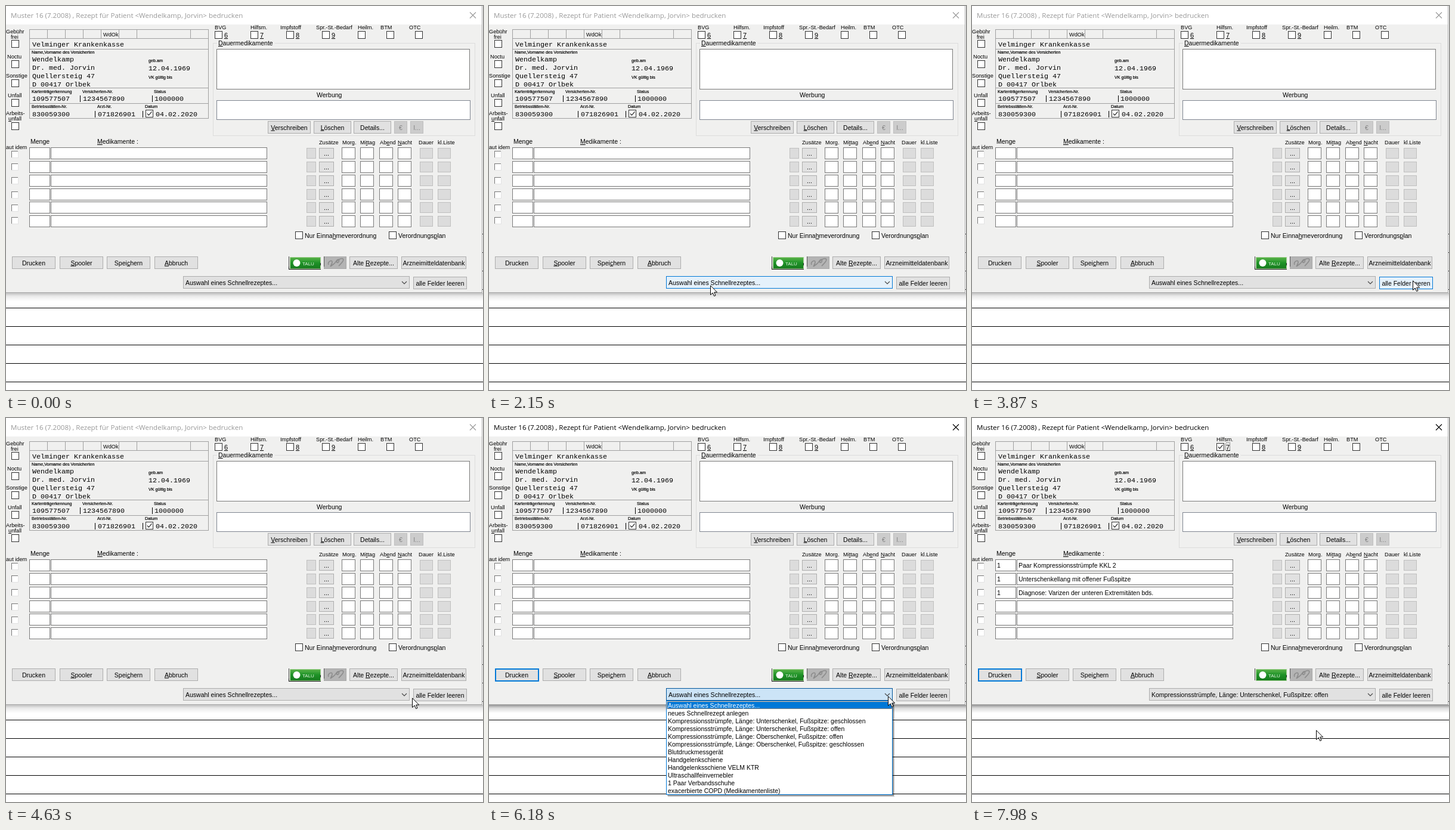
An HTML page for the animation above (8000 ms loop, 800x644 px).

```html
<!DOCTYPE html>
<html lang="de">
<head>
<meta charset="utf-8">
<title>Rezept bedrucken</title>
<style>
html, body { margin: 0; width: 100%; height: 100%; overflow: hidden; background: #fff; }
svg { display: block; width: 800px; height: 644px; font: 10.5px "Liberation Sans", Arial, sans-serif; }
text { white-space: pre; }
rect, .crisp { shape-rendering: crispEdges; }
.title { font: 11.55px "Open Sans", "Noto Sans", sans-serif; }
.mono { font: 11.67px "Liberation Mono", monospace; }
.s { font-size: 9.2px; }
.tiny { font-size: 7.2px; stroke: #000; stroke-width: .2px; }
.u { text-decoration: underline; }
</style>
</head>
<body>
<svg id="stage" viewBox="0 0 800 644"></svg>
<script>
const LOOP = 8000, BLUE = '#0078d7', FACE = '#f0f0ef';
const HINT = 'Auswahl eines Schnellrezeptes...';
const ITEMS = [
  HINT, 'neues Schnellrezept anlegen',
  'Kompressionsstrümpfe, Länge: Unterschenkel, Fußspitze: geschlossen',
  'Kompressionsstrümpfe, Länge: Unterschenkel, Fußspitze: offen',
  'Kompressionsstrümpfe, Länge: Oberschenkel, Fußspitze: offen',
  'Kompressionsstrümpfe, Länge: Oberschenkel, Fußspitze: geschlossen',
  'Blutdruckmessgerät', 'Handgelenkschiene', 'Handgelenksschiene VELM KTR',
  'Ultraschallfeinvernebler', '1 Paar Verbandsschuhe',
  'exacerbierte COPD (Medikamentenliste)'
];
const ROWS = [237, 260, 283, 306, 328, 351];

// --- drawing helpers: "&" marks the underlined access key ---
const esc = s => s.replace(/</g, '&lt;').replace(/>/g, '&gt;');
const label = s => esc(s).replace(/&(?!lt;|gt;)(.)/, '<tspan class="u">$1</tspan>');
const text = (x, y, s, cls = '', more = '') =>
  `<text x="${x}" y="${y}" class="${cls}" ${more}>${label(s)}</text>`;
const fill = (x, y, w, h, c, more = '') =>
  `<rect x="${x}" y="${y}" width="${w}" height="${h}" fill="${c}" ${more}/>`;
const box = (x, y, w, h, c = '#fff', line = '#7a7a7a', more = '') =>
  fill(x + .5, y + .5, w - 1, h - 1, c, `stroke="${line}" ${more}`);
const path = (d, c, w = 1, more = '') =>
  `<path d="${d}" fill="none" stroke="${c}" stroke-width="${w}" ${more}/>`;
const button = (x, y, w, h, s, more = '') =>
  box(x, y, w, h, '#e1e1e1', '#adadad', more) +
  text(x + w / 2, y + h / 2 + 4, s, '', 'text-anchor="middle"');
const disabled = (x, y, w, h, s) => box(x, y, w, h, '#ccc', '#bfbfbf') +
  text(x + w / 2, y + h / 2 + 4, s, '', 'text-anchor="middle" fill="#838383"');
const check = (x, y) => box(x, y, 13, 13, '#fff', '#333');
const tick = (x, y, more = '') => path(`M${x + 3} ${y + 6.5}l2.5 2.7 5-6`, '#222', 1.2, more);

function background() {
  let s = fill(0, 0, 800, 644, '#fff');
  for (let y = 382; y < 644; y += 31) s += fill(0, y, 800, 1, '#000');
  return s + `<defs><linearGradient id="fade" x2="0" y2="1">
    <stop stop-color="#000" stop-opacity=".42"/><stop offset=".4" stop-color="#000" stop-opacity=".14"/>
    <stop offset="1" stop-color="#000" stop-opacity="0"/></linearGradient>
    <linearGradient id="green" x2="0" y2="1"><stop stop-color="#5fb54c"/><stop offset=".5" stop-color="#1f9328"/>
    <stop offset="1" stop-color="#167a1d"/></linearGradient></defs>` +
    fill(0, 481, 800, 14, 'url(#fade)', 'id="shadow"') +
    fill(0, 0, 799, 481, FACE) + fill(0, 0, 799, 31, '#fff') +
    fill(798, 0, 1, 481, '#aaa') + fill(0, 480, 799, 1, '#aaa') +
    `<g id="caption">${text(8, 20, 'Muster 16 (7.2008) , Rezept für Patient <Wendelkamp, Jorvin> bedrucken', 'title')}</g>` +
    path('M778 10.5l10 10m0-10l-10 10', '#999', 1.1, 'id="close"');
}

function leftChecks() {
  const labels = [[0, 46, 'Gebühr'], [8, 55, 'frei'], [2, 88, 'Noctu'], [0, 120, 'Sonstige'],
    [3, 153, 'Unfall'], [0, 183, 'Arbeits-'], [4, 192, '&unfall']];
  return labels.map(a => text(...a, 's')).join('') +
    [57, 91, 123, 156, 195].map(y => check(9, y)).join('');
}

function card() {
  let s = box(39, 39, 301, 150, FACE, '#a0a0a0');
  for (const y of [54, 72, 137, 163]) s += fill(39, y, 301, 1, '#a0a0a0');
  for (const x of [69, 99, 129, 159, 189, 219, 309]) s += fill(x, 39, 1, 16, '#a0a0a0');
  s += text(163, 51, 'WdOk', 's');
  const mono = [[44, 68, 'Velminger Krankenkasse'], [44, 93, 'Wendelkamp'], [44, 107, 'Dr. med. Jorvin'],
    [44, 121, 'Quellersteig 47'], [44, 135, 'D 00417 Orlbek'], [239, 108, '12.04.1969'],
    [44, 159, '109577507'], [129, 159, '1234567890'], [249, 159, '1000000'],
    [44, 185, '830059300'], [154, 185, '071826901'], [251, 185, '04.02.2020']];
  const tiny = [[43, 80, 'Name,Vorname des Versicherten'], [239, 94, 'geb.am'], [239, 122, 'VK gültig bis'],
    [43, 146, 'Kartenträgerkennung'], [128, 146, 'Versicherten-Nr.'], [248, 146, 'Status'],
    [43, 171, 'Betriebsstätten-Nr.'], [153, 171, 'Arzt-Nr.'], [233, 171, 'Datum']];
  s += mono.map(a => text(...a, 'mono')).join('') + tiny.map(a => text(...a, 'tiny')).join('');
  for (const [x, y] of [[124, 150], [245, 150], [149, 176], [229, 176]]) s += fill(x, y, 1, 11, '#000');
  return s + check(234, 174) + tick(234, 174);
}

function topChecks() {
  const heads = [[350, 350, 'BVG'], [410, 410, 'Hilfsm.'], [460, 470, 'Impfstoff'],
    [520, 530, 'Spr.-St.-Bedarf'], [590, 590, 'Heilm.'], [628, 638, 'BTM'], [676, 686, 'OTC']];
  return heads.map(([tx, x, s], i) => text(tx, 39, s, 's') + check(x, 42) +
    (i < 4 ? text(x + 16, 53, '&' + (6 + i), '', 'font-size="11"') : '')).join('');
}

function medsGroup() {
  return box(347, 62, 440, 156, FACE, '#dcdcdc') + fill(354, 60, 97, 6, FACE) +
    text(356, 66, '&Dauermedikamente') + box(353, 72, 425, 68) +
    text(521, 153, 'Werbung') + box(353, 158, 426, 33, '#fff', '#7f8590') +
    button(439, 193, 72, 21, '&Verschreiben') + button(516, 193, 63, 21, '&Löschen') +
    button(583, 193, 63, 21, 'Details...') + disabled(651, 193, 22, 21, '€') + disabled(678, 193, 22, 21, 'I...');
}

function table() {
  const heads = [[525, 'Zusätze'], [564, 'Morg.'], [594, 'Mi&ttag'], [627, 'Ab&end'], [657, '&Nacht'],
    [692, 'Dauer'], [724, 'kl.Liste']];
  const marks = [243, 264, 287, 311, 333, 354];
  let s = text(41, 231, 'Menge') + text(153, 231, '&Medikamente :');
  s += heads.map(([x, h]) => text(x, 232, h, 's')).join('');
  ROWS.forEach((y, i) => {
    const m = marks[i];
    s += fill(9, m, 11, 11, '#fff') + path(`M9.5 ${m + 11}v-10.5h10.5`, '#777', 1.4, 'class="crisp"') +
      path(`M9 ${m + 11.5}h11.5v-11`, '#e3e3e3', 1, 'class="crisp"');
    s += box(39, y, 35, 20) + box(75, y, 363, 20);
    s += box(504, y + 1, 16, 18, '#dcdcdc', '#bfbfbf') + button(525, y + 1, 25, 18, '...');
    for (const x of [563, 594, 626, 657]) s += box(x, y, 23, 20);
    for (const x of [694, 724]) s += box(x, y + 1, 22, 18, '#dcdcdc', '#bfbfbf');
  });
  return s + fill(0, 233, 36, 9, FACE) + text(0, 240, 'aut idem', 's') +
    check(485, 378) + text(501, 389, 'Nur Einna&hmeverordnung') +
    check(642, 378) + text(658, 389, 'Verordnungs&plan');
}

function footer() {
  return button(10, 420, 73, 21, 'Drucken', 'id="print"') + button(90, 420, 73, 21, '&Spooler') +
    button(169, 420, 73, 21, 'Spei&chern') + button(249, 420, 73, 21, '&Abbruch') +
    fill(474, 420, 1, 20, '#444') +
    `<g id="frame">${path('M474.5 437v4.5h53v-4.5', '#111', 1, 'class="crisp"')}</g>` +
    fill(476, 421, 51, 19, 'url(#green)', 'stroke="#9fd08f"') + '<circle cx="487.5" cy="431" r="6" fill="#fff"/>' +
    text(497, 434.5, 'TALU', '', 'fill="#e8f5e4" font-size="8"') + fill(527, 431, 1, 4, '#222') +
    box(533, 420, 38, 21, '#b4b4b4', '#a8a8a8') + fill(533, 420, 1, 17, '#555') +
    path('M541 434c-3-5 7-10 6-4s-6 9 1 4 6-9 9-9 1 7-2 5 7-8 10-6-3 8-7 12', '#8c8c8c', 1.6) +
    button(576, 420, 81, 21, 'Alte &Rezepte...') + button(663, 420, 109, 21, 'Arzneimitteldatenbank') +
    box(297, 453, 380, 21, '#e1e1e1', '#adadad', 'id="combo"') +
    `<text id="choice" x="301" y="468"></text>` + path('M664 462l4 4 4-4', '#444', 1.1) +
    button(683, 454, 90, 21, 'alle Felder leeren', 'id="clear"');
}

function result() {
  const lines = ['Paar Kompressionsstrümpfe KKL 2', 'Unterschenkellang mit offener Fußspitze',
    'Diagnose: Varizen der unteren Extremitäten bds.'];
  return `<g id="result">${lines.map((s, i) =>
    text(42, ROWS[i] + 14, '1') + text(78, ROWS[i] + 14, s)).join('')}</g>
    <g id="aid">${tick(410, 42)}${path('M425.5 41.5h7v13h-7z', '#333', 1, 'stroke-dasharray="1 1" class="crisp"')}</g>`;
}

function list() {
  return `<clipPath id="roll"><rect id="rollBox" x="290" y="474" width="395" height="162"/></clipPath>
    <g id="list" clip-path="url(#roll)">${fill(300, 476, 380, 159, '#000', 'opacity=".22"')}
    ${fill(299, 475, 379.5, 158.5, '#000', 'opacity=".22"')}${box(297, 474, 380, 158, '#fff', BLUE)}
    ${box(298, 475, 378, 13, BLUE, '#ff8728', 'id="bar" stroke-dasharray="1 1"')}
    ${ITEMS.map((s, i) => text(300, 486 + 13 * i, s, 'item')).join('')}</g>`;
}

const pointer = `<circle id="click" r="11.5" fill="#ffe000" fill-opacity=".35" stroke="#e8b800" stroke-opacity=".5"/>
  <path id="cursor" d="M.5 .8V16.4L4.2 13L6.6 18.5L9 17.5L6.7 12.1H11.6Z" fill="#fff" stroke="#000"/>`;

document.getElementById('stage').innerHTML = background() + leftChecks() + card() + topChecks() +
  medsGroup() + table() + footer() + result() + list() + pointer;

// --- pointer track: time, x, y; every position holds until the next ---
const TRACK = [
  [530, 684, 595], [640, 676, 548], [740, 520, 472],
  [890, 450, 450], [990, 402, 432], [1080, 376, 420], [1180, 360, 413],
  [1400, 344, 391], [1510, 342, 389], [1610, 342, 393], [1720, 346, 406], [1830, 352, 424],
  [1940, 360, 444], [2050, 367, 460], [2150, 371, 468],
  [2260, 360, 467], [2360, 372, 465], [2470, 402, 463], [2570, 442, 462], [2680, 474, 462],
  [2780, 492, 463], [2890, 488, 463], [2990, 481, 463], [3130, 438, 464],
  [3350, 560, 464], [3460, 678, 462], [3560, 737, 460], [3870, 739, 460],
  [4010, 727, 465], [4110, 712, 468], [4200, 703, 469], [4420, 695, 469], [4520, 688, 469],
  [4630, 681, 469], [4770, 674, 469], [4880, 667, 469], [5200, 667, 468], [5280, 667, 466],
  [6060, 668, 466], [6180, 669, 466], [6490, 655, 473], [6570, 637, 482],
  [6710, 620, 490], [6820, 605, 499], [6920, 592, 508], [7030, 581, 515], [7130, 577, 523]
];

const $ = id => document.getElementById(id);
const items = [...document.querySelectorAll('.item')];
const show = (id, on) => $(id).setAttribute('visibility', on ? 'visible' : 'hidden');
const paint = (id, f, s) => { $(id).setAttribute('fill', f); $(id).setAttribute('stroke', s); };
const inside = (p, x, y, w, h) => p && p[1] >= x && p[1] < x + w && p[2] >= y && p[2] < y + h;

function draw(t) {
  const at = TRACK.filter(p => p[0] <= t).pop();
  const active = t >= 5630, open = t >= 5740 && t < 7770, done = t >= 7770;

  show('cursor', at);
  show('click', (t >= 5630 && t < 5860) || (t >= 7550 && t < 7770));
  if (at) for (const id of ['cursor', 'click']) $(id).setAttribute('transform', `translate(${at[1]} ${at[2]})`);

  $('caption').setAttribute('fill', active ? '#000' : '#999');
  $('close').setAttribute('stroke', active ? '#000' : '#999');
  $('shadow').setAttribute('opacity', active ? 1 : .6);
  paint('print', '#e1e1e1', active ? BLUE : '#adadad');
  $('print').setAttribute('stroke-width', active ? 2 : 1);

  if (active && !done) paint('combo', '#cce4f7', '#005499');
  else if (inside(at, 297, 453, 380, 21)) paint('combo', '#e5f1fb', BLUE);
  else paint('combo', '#e1e1e1', '#adadad');
  const over = inside(at, 683, 454, 90, 21);
  paint('clear', over ? '#e5f1fb' : '#e1e1e1', over ? BLUE : '#adadad');
  $('choice').textContent = done ? ITEMS[3] : HINT;

  show('list', open);
  $('rollBox').setAttribute('height', t < 5860 ? 80 : 162);
  const row = at && t >= 6490 ? Math.max(0, Math.floor((at[2] - 475) / 13)) : 0;
  $('bar').setAttribute('y', 475.5 + 13 * row);
  items.forEach((el, i) => el.setAttribute('fill', i === row ? '#fff' : '#000'));

  show('result', done);
  show('aid', t >= 7980);
  show('frame', t < 7980);
}

const start = performance.now();
function tickClock(now) {
  draw(Math.max(0, now - start) % LOOP);
  requestAnimationFrame(tickClock);
}
draw(0);
requestAnimationFrame(tickClock);
</script>
</body>
</html>
```
